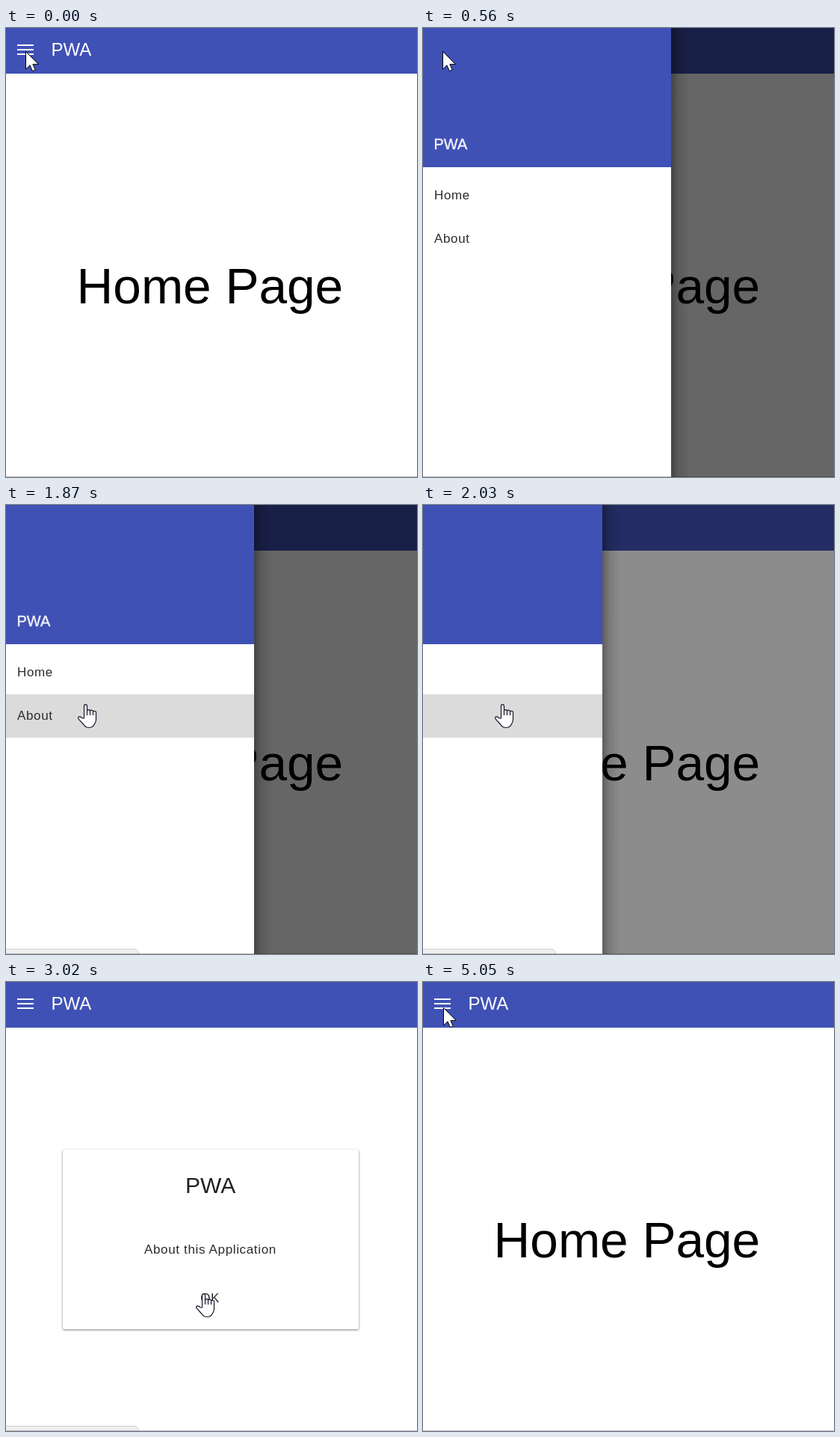
Write an HTML page that moves like this. It is 550 px wide and 600 px high and loops after 5.13 s.

```html
<!DOCTYPE html>
<html lang="en">
<head>
<meta charset="utf-8">
<title>App drawer demo</title>
<style>
  html, body { margin: 0; width: 100%; height: 100%; overflow: hidden; background: #fff; }
  svg { display: block; width: 550px; height: 600px; font-family: "Liberation Sans", Arial, sans-serif; }
  .body { font-size: 17px; letter-spacing: .65px; fill: #2b2b2b; }
  #card { filter: drop-shadow(0 1px 1.5px rgba(0, 0, 0, .5)); }
</style>
</head>
<body>
<svg viewBox="0 0 550 600">
  <defs>
    <linearGradient id="fade">
      <stop offset="0" stop-opacity=".34"/>
      <stop offset=".4" stop-opacity=".12"/>
      <stop offset="1" stop-opacity="0"/>
    </linearGradient>
  </defs>
  <rect width="550" height="600" fill="#fff"/>

  <text id="home" x="94.6" y="368" font-size="67.5">Home Page</text>
  <g id="dialog">
    <rect id="card" x="76" y="224" width="396" height="240" rx="2" fill="#fff"/>
    <text x="240" y="282" font-size="30" fill="#212121">PWA</text>
    <text class="body" x="185" y="363">About this Application</text>
    <text class="body" x="260.2" y="428">OK</text>
  </g>

  <rect width="550" height="61" fill="#3f51b5"/>
  <path d="M15 22h22v2h-22zM15 28h22v2h-22zM15 34h22v2h-22z" fill="#fff"/>
  <text x="60.5" y="37" font-size="24" fill="#fff">PWA</text>

  <rect id="scrim" width="550" height="600"/>
  <g id="drawer">
    <rect x="332" width="24" height="600" fill="url(#fade)"/>
    <rect width="332" height="600" fill="#fff"/>
    <rect width="332" height="186" fill="#3f51b5"/>
    <rect id="hover" y="253" width="332" height="58" fill="#dbdbdb"/>
    <text x="14.5" y="162" font-size="20" fill="#f0f1fa" stroke="#f0f1fa" stroke-width=".45">PWA</text>
    <text class="body" x="15" y="229">Home</text>
    <text class="body" x="15" y="287">About</text>
  </g>

  <rect id="status" x="-8" y="593.5" width="185.5" height="20" rx="6" fill="#f0f0f0" stroke="#cfcfcf"/>
  <rect y="599" width="550" height="1" fill-opacity=".22"/>

  <g id="cursor" fill="#fff" stroke="#000" stroke-linejoin="round">
    <path id="arrow" d="M.5 .5V24L6 18.7L9.4 26.5L13.2 24.9L9.9 17.4H17.4Z"/>
    <g id="hand" transform="translate(-9 0)" stroke="#15152a" stroke-width="1.2">
      <path d="M8.5 19V2.8a2 2.2 0 0 1 4 0V9.2a2 1.8 0 0 1 4 .4a2 1.8 0 0 1 4 1a2 1.8 0 0 1 4 1.4V21c0 3-1.5 5-2.5 6.5c-1.5 3-3 4-7 4s-5.5-1.5-7-4L1 19.8c-1-1.8 0-3 1.5-3s2.5 .8 3.5 2z"/>
      <path d="M12.5 9V15M16.5 9.6V15M20.5 11V15" fill="none"/>
    </g>
  </g>
</svg>
<script>
const LOOP = 5130;
const DRAWER = 332;
const $ = id => document.getElementById(id);

const linear = p => p;
const easeInOut = p => p * p * (3 - 2 * p);
const easeOut = power => p => 1 - (1 - p) ** power;

// Pointer moves: first step, last step, number of steps, target, easing
const START = [26, 31];
const MOVES = [
  [870, 1330, 7, [105, 263], easeInOut],
  [1400, 1400, 1, [105, 265], linear],
  [1570, 1570, 1, [105, 266], linear],
  [2330, 2800, 7, [250, 400], easeInOut],
  [2870, 3100, 4, [270, 425], easeOut(1.5)],
  [3500, 3500, 1, [268, 428], linear],
  [3970, 3970, 1, [261, 411], linear],
  [4050, 4430, 6, [108, 147], linear],
  [4510, 4970, 7, [33, 40], easeOut(2)],
  [5050, 5050, 1, [27, 34], linear]
];

// Stepped states: time, drawer width shown, scrim opacity
const DRAWER_STEPS = [
  [0, -30, 0],
  [230, 118, .25], [310, 232, .45], [380, 297, .55], [470, 325, .59], [560, DRAWER, .6],
  [2030, 240, .45], [2100, 75, .16], [2180, -30, 0]
];

function pointerAt(t) {
  let pos = START;
  for (const [from, to, count, target, ease] of MOVES) {
    if (t < from) break;
    const gap = count > 1 ? (to - from) / (count - 1) : 1;
    const step = Math.min(count, Math.floor((t - from) / gap + 1e-6) + 1);
    const p = ease(step / count);
    pos = pos.map((v, i) => Math.round(v + (target[i] - v) * p));
  }
  return pos;
}

function statusAt(t) {
  if (t < 1570) return 0;
  if (t < 1640) return .5;
  if (t < 3340) return 1;
  return .9 * Math.min(1, Math.max(0, (4970 - t) / 900));
}

const show = (id, on) => $(id).setAttribute("visibility", on ? "visible" : "hidden");
const move = (id, x, y) => $(id).setAttribute("transform", `translate(${x} ${y})`);

function draw(t) {
  const [, width, dim] = DRAWER_STEPS.filter(s => s[0] <= t).pop();
  move("drawer", width - DRAWER, 0);
  $("scrim").setAttribute("opacity", dim);
  show("hover", t >= 1870 && t < 2180);

  const about = t >= 2100 && t < 3500;
  show("dialog", about);
  show("home", !about);
  $("status").setAttribute("opacity", statusAt(t));

  const [x, y] = pointerAt(t);
  const overItem = t >= 870 && t < 2330 && y > 195;
  const overButton = t >= 2870 && t < 3500;
  const hand = overItem || overButton;
  move("cursor", x, y);
  show("hand", hand);
  show("arrow", !hand);
}

const begin = performance.now();
function frame() {
  draw((performance.now() - begin) % LOOP);
  requestAnimationFrame(frame);
}
draw(0);
requestAnimationFrame(frame);
</script>
</body>
</html>
```
